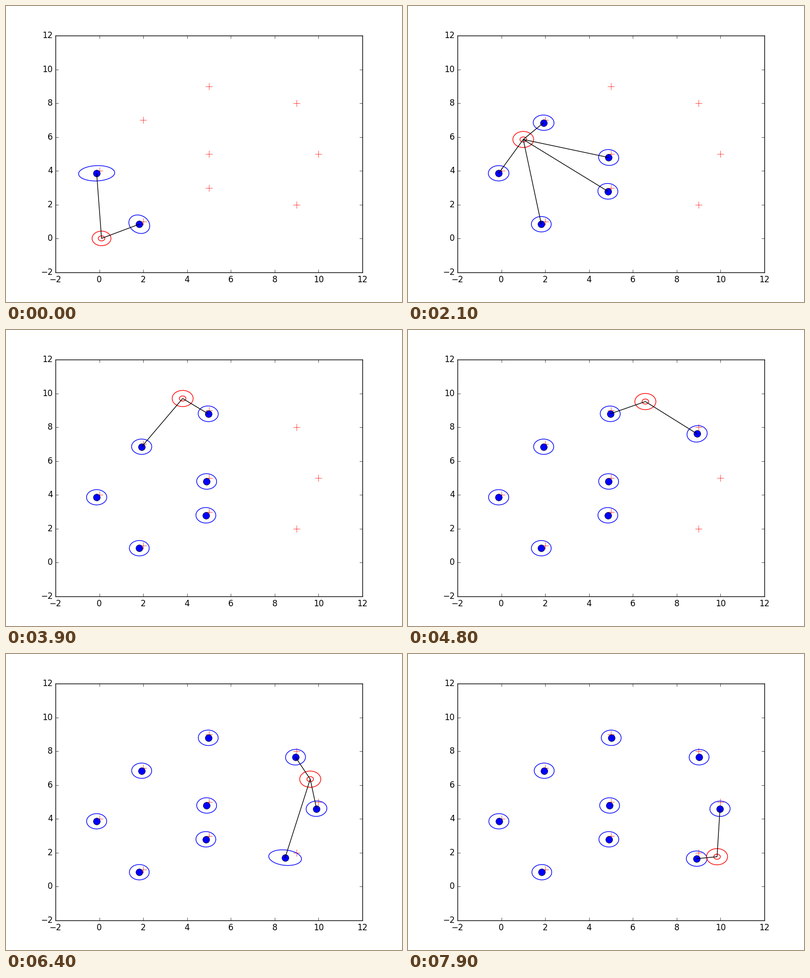
Animation, 800 px wide and 600 px high, one loop 8 s. Source, as a matplotlib script:

```python
import numpy as np
import matplotlib.pyplot as plt
from matplotlib.animation import FuncAnimation

FRAMES, STEP_MS = 80, 100
SIGHT = 4.95     # sensor range
MARK_R = 0.452   # settled uncertainty of a landmark
plt.rcParams.update({
    "font.family": "DejaVu Sans", "font.size": 12, "text.hinting": "auto",
    "lines.linewidth": 1.0, "lines.solid_capstyle": "butt",
    "ytick.alignment": "center",
})

# Key points of the robot's path: frame, x, y
TRACK = np.array([
    (0, 0.10, 0.01), (2, 0.58, 0.06), (4, 0.77, 0.62), (12, 0.856, 3.10),
    (21, 1.00, 5.86), (30, 1.67, 8.32), (39, 3.80, 9.70), (48, 6.57, 9.52),
    (56, 8.65, 8.45), (64, 9.62, 6.35), (79, 9.84, 1.765),
])
MARKS = np.array([(0, 4), (2, 1), (5, 5), (2, 7), (5, 3),
                  (5, 9), (9, 8), (10, 5), (9, 2)], float)

ANGLE = np.linspace(0, 2 * np.pi, 60)
UNIT = np.column_stack([np.cos(ANGLE), np.sin(ANGLE)])
GAP = np.full((1, 2), np.nan)


def robot(f):
    """Cubic Hermite curve through the key points."""
    t, p = TRACK[:, 0], TRACK[:, 1:]
    slope = np.gradient(p, t, axis=0)
    i = min(np.searchsorted(t, f, side="right") - 1, len(t) - 2)
    h = t[i + 1] - t[i]
    u = (f - t[i]) / h
    return ((1 + 2 * u) * (1 - u) ** 2 * p[i] + u * (1 - u) ** 2 * h * slope[i]
            + u * u * (3 - 2 * u) * p[i + 1] + u * u * (u - 1) * h * slope[i + 1])


# The map is slightly skewed against the true landmarks
x, y = MARKS.T
SETTLED = MARKS + np.column_stack([0.018 * y - 0.195, -0.14 - 0.0026 * x ** 2])

# Landmarks are sensed halfway through each step
EYES = np.array([robot(max(f - 0.5, 0)) for f in range(FRAMES)])
SEEN = np.linalg.norm(EYES[:, None] - SETTLED, axis=2) < SIGHT
START = SEEN.argmax(axis=0)

# First line of sight, and the unit vector across it
LOOK = SETTLED - [robot(f) for f in START]
DIST = np.linalg.norm(LOOK, axis=1)
ACROSS = np.column_stack([-LOOK[:, 1], LOOK[:, 0]]) / DIST[:, None]


def estimate(i, f):
    """First guesses err more the later they come, then settle."""
    slip = -(-1) ** i * 0.0058 * START[i] * 0.75 ** (f - START[i])
    closing = np.clip((f - 65) / 10, 0, 1) * (0.01 + 0.007 * MARKS[i, 0])
    return SETTLED[i] + slip * ACROSS[i] + [closing, 0]


def spread(i, f):
    """Uncertainty outline, widest across the first line of sight."""
    noise = 0.016 * (1 + np.exp(-START[i]))
    extra = noise * DIST[i] ** 2 / (1 + 1.3 * (f - START[i]))
    wide = np.sqrt(MARK_R ** 2 + extra)
    shape = MARK_R * np.eye(2) + (wide - MARK_R) * np.outer(ACROSS[i], ACROSS[i])
    return estimate(i, f) + UNIT @ shape


fig = plt.figure(figsize=(8, 6), dpi=100, facecolor="white")
ax = fig.add_axes([0.125, 0.1, 0.775, 0.8])
ax.set(xlim=(-2, 12), ylim=(-2, 12),
       xticks=range(-2, 13, 2), yticks=range(-2, 13, 2))
ax.tick_params(direction="in", top=True, right=True, length=4, width=0.5, pad=4)
for spine in ax.spines.values():
    spine.set_linewidth(1.0)

ax.plot(x, y, "+", color="red", ms=10, mew=0.5)
dots, = ax.plot([], [], "o", color="blue", ms=10, mec="black", mew=0.5)
rings, = ax.plot([], [], color="blue")
body, = ax.plot([], [], color="red")
rays, = ax.plot([], [], color="black")


def put(line, parts):
    """Show several pieces with one line artist."""
    pts = np.vstack([q for part in parts for q in (part, GAP)])
    line.set_data(pts[:, 0], pts[:, 1])


def draw(f):
    pos = robot(f)
    radius = 0.48 - 0.05 * np.exp(-f / 10)
    known = np.flatnonzero(START <= f)
    put(dots, [estimate(i, f)[None] for i in known])
    put(rings, [spread(i, f) for i in known])
    put(body, [pos + r * UNIT for r in (radius, 0.15)])
    put(rays, [np.array([pos, estimate(i, f)]) for i in np.flatnonzero(SEEN[f])])
    return dots, rings, body, rays


anim = FuncAnimation(fig, draw, frames=FRAMES, interval=STEP_MS,
                     repeat=True, repeat_delay=0, blit=False)
plt.show()
```
